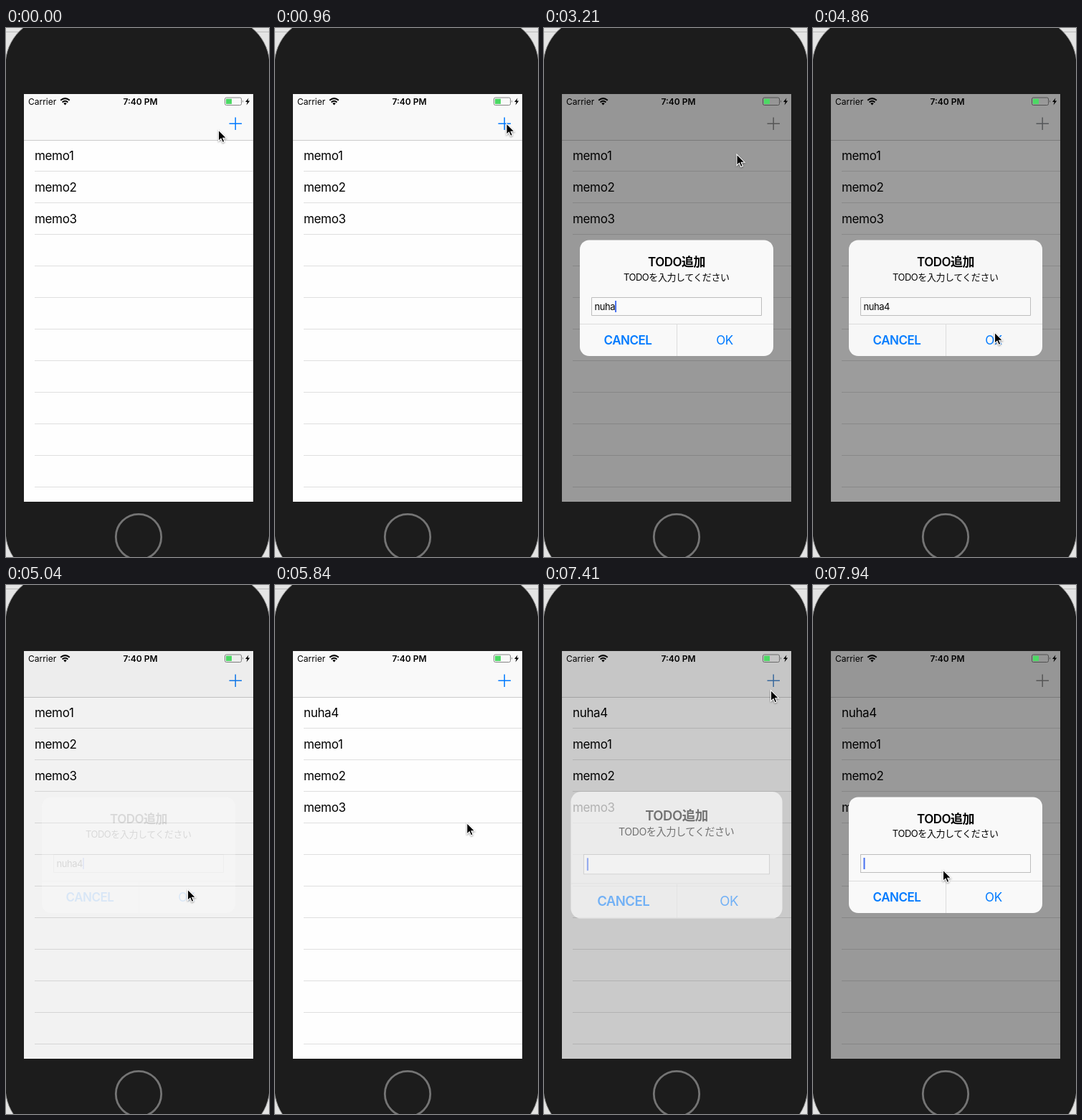
Write an HTML page that moves like this. It is 367 px wide and 737 px high and loops after 8000 ms.

```html
<!DOCTYPE html>
<html lang="ja">
<head>
<meta charset="utf-8">
<style>
html, body { margin: 0; height: 100%; overflow: hidden; background: #e4e4e4; }
svg { display: block; width: 367px; height: 737px; }
text { font-family: Inter, 'Noto Sans CJK JP', 'Noto Sans CJK', sans-serif; white-space: pre; }
.body { font-size: 17px; letter-spacing: -.35px; }
.bold { font-weight: 600; }
.body.bold { letter-spacing: -.5px; }
.mid { text-anchor: middle; }
.blue { fill: #007aff; }
.small { font-size: 13px; letter-spacing: -.45px; }
.status { font-size: 12px; }
</style>
</head>
<body>
<svg viewBox="0 0 367 737">
  <defs><clipPath id="screen"><path d="M25 92h320v568H25z"/></clipPath></defs>
  <path d="M0 5.5h367" stroke="#bbb"/>
  <rect x="-1" y="-15" width="369" height="782" rx="67" fill="#1c1c1c" stroke="#999"/>
  <circle cx="185" cy="709" r="31.7" fill="none" stroke="#747474" stroke-width="2.8"/>

  <g clip-path="url(#screen)">
    <path d="M25 92h320v568H25z" fill="#fefefe"/>
    <g id="blanks"></g>
    <g id="rows"></g>
    <path d="M25 92h320v64H25z" fill="#f9f9f9"/>
    <path d="M25 156.5h320" stroke="#cbcbcb"/>
    <text class="status" x="31" y="106.5">Carrier</text>
    <g fill="none" stroke="#000" stroke-width="2">
      <path d="M76.2 100.7q6.3-5.2 12.6 0M78.6 103.4q3.9-3.2 7.8 0"/>
      <path d="M80.3 104.9q2.2-1.6 4.4 0l-2.2 2.5z" fill="#000" stroke="none"/>
    </g>
    <text class="status bold mid" x="187.5" y="106.5">7:40 PM</text>
    <rect x="305.5" y="97" width="23" height="10.5" rx="2" fill="none" stroke="#858585"/>
    <path d="M330 100.5q2 1.7 0 3.5z" fill="#858585"/>
    <path d="M338.5 97.5l-4.5 5.6h2.7l-1.2 4.4 4.7-6h-2.8z"/>
    <path id="plus" d="M311.5 133.2h17.5M320.2 124.5v17.5" stroke-width="1.5"/>
    <path id="dim" d="M25 92h320v568H25z"/>
    <path d="M307 98.7h8v7.2h-8z" fill="#4cd964"/>

    <g id="dialog">
      <rect id="panel" x="50" y="295.5" width="270" height="161.5" rx="13" fill="#f9f9f9"/>
      <g id="content">
        <text class="body bold mid" x="185" y="332">TODO追加</text>
        <text class="small mid" x="184.7" y="351.5">TODOを入力してください</text>
        <path d="M66.5 375.5h237v25h-237z" fill="#fafafa" stroke="#bdbdbd"/>
        <text id="field" class="small" x="70.5" y="392.5"></text>
        <path id="caret" d="M0 380h2v16h-2z" fill="#456ff0"/>
        <path d="M50 412.5h270M185.5 412.5v44.5" stroke="#dcdcdc"/>
        <text class="body bold mid blue" x="117" y="441">CANCEL</text>
        <text class="body mid blue" x="252" y="441">OK</text>
      </g>
    </g>
  </g>
  <path id="cursor" d="M0 0V15.5L3.5 12.2 5.8 17.4 8.4 16.2 6.2 11.2H11Z" stroke="#fff" stroke-width="1.1"
    style="filter:drop-shadow(0 1px 1px #0006)"/>
</svg>
<script>
const LOOP = 8000, ROW = 44, TOP = 156, ENTRY = 'nuha4';
const TYPE = 2980, LAST_KEY = 3750, REOPEN = 7410;
const $ = id => document.getElementById(id);
const clamp = v => Math.min(1, Math.max(0, v));
const ramp = (t, from, to) => clamp((t - from) / (to - from));
const mix = (a, b, k) => a + (b - a) * k;
const set = (node, attrs) => Object.entries(attrs).forEach(([k, v]) => node.setAttribute(k, v));

// Mouse strokes: start, end, and the point reached.
const strokes = [
  [50, 140, 302, 140], [380, 670, 260, 232], [670, 960, 323, 133], [2090, 2330, 269, 176],
  [3750, 4620, 253.5, 424], [5550, 6190, 264, 249], [6660, 7060, 316.5, 146.5], [7500, 7940, 181.5, 397]
];

// Every stroke slows down towards its end and bows slightly clockwise.
function cursorAt(t) {
  let x = 296.5, y = 142;
  for (const [from, to, endX, endY] of strokes) {
    const k = 1 - (1 - ramp(t, from, to)) ** 1.25;
    const bow = k < 1 ? .05 * Math.sin(Math.PI * k) : 0;
    const dx = endX - x, dy = endY - y;
    x += dx * k - dy * bow;
    y += dy * k + dx * bow;
    if (k < 1) break;
  }
  return [x, y];
}

const row = (label, i) => `<g><text class="body" x="40" y="${TOP + ROW * i + 27.7}">${label}</text>
  <path d="M40 ${TOP + ROW * i + 43.5}h305" stroke="#dfdfdf"/></g>`;
$('rows').innerHTML = row(ENTRY, 0) + [1, 2, 3].map(n => row('memo' + n, n - 1)).join('');
$('blanks').innerHTML = Array.from({ length: 8 }, (_, i) => row('', i + 3)).join('');
const [added, ...memos] = $('rows').children;

// Opacity of the dialog: settles in quickly, fades out evenly.
function dialogLevel(t) {
  const appear = start => 1 - .5 * Math.exp((start - t) / 50);
  if (t >= REOPEN) return appear(REOPEN);
  return t < 1790 ? 0 : appear(1625) * (1 - ramp(t, 4855, 5065));
}

function typedCount(t) {
  if (t >= REOPEN || t < TYPE) return 0;
  return t >= LAST_KEY ? 5 : Math.min(4, 1 + Math.floor((t - TYPE) / 77));
}

// The caret blinks once a second after half a second of rest.
function caretLevel(t) {
  if (t < 1850) return 0;
  const since = t >= REOPEN ? REOPEN : t >= LAST_KEY ? LAST_KEY : t >= TYPE ? TYPE + 230 : 1417;
  return clamp(.5 - 1.2 * Math.cos(2 * Math.PI * Math.max(500, t - since) / 1000));
}

function draw(t) {
  const level = dialogLevel(t), fading = t > 4800 && t < REOPEN;
  const scale = fading ? 1 : 1 + .19 * (1 - level);
  set($('dim'), { opacity: .4 * level });
  set($('dialog'), { transform: `translate(185 376) scale(${scale}) translate(-185 -376)` });
  set($('panel'), { opacity: Math.sqrt(level) });
  set($('content'), { opacity: level });
  set($('plus'), {
    stroke: `rgb(${[0, 122, 255].map(c => mix(c, 142, level))})`,
    opacity: t < 1320 ? 1 : mix(.3, 1, ramp(t, 1400, 1490))
  });

  const typed = typedCount(t);
  $('field').textContent = ENTRY.slice(0, typed);
  const width = typed ? $('field').getComputedTextLength() : 0;
  set($('caret'), { transform: `translate(${70.5 + width})`, opacity: caretLevel(t) });

  const k = ramp(t, 5550, 5830), slide = k * k * (3 - 2 * k);
  set(added, { transform: `translate(${320 * (1 - slide)})` });
  memos.forEach(m => set(m, { transform: `translate(0 ${ROW * slide})` }));

  set($('cursor'), { transform: `translate(${cursorAt(t)})` });
}

function tick() {
  draw(performance.now() % LOOP);
  requestAnimationFrame(tick);
}
tick();
</script>
</body>
</html>
```
